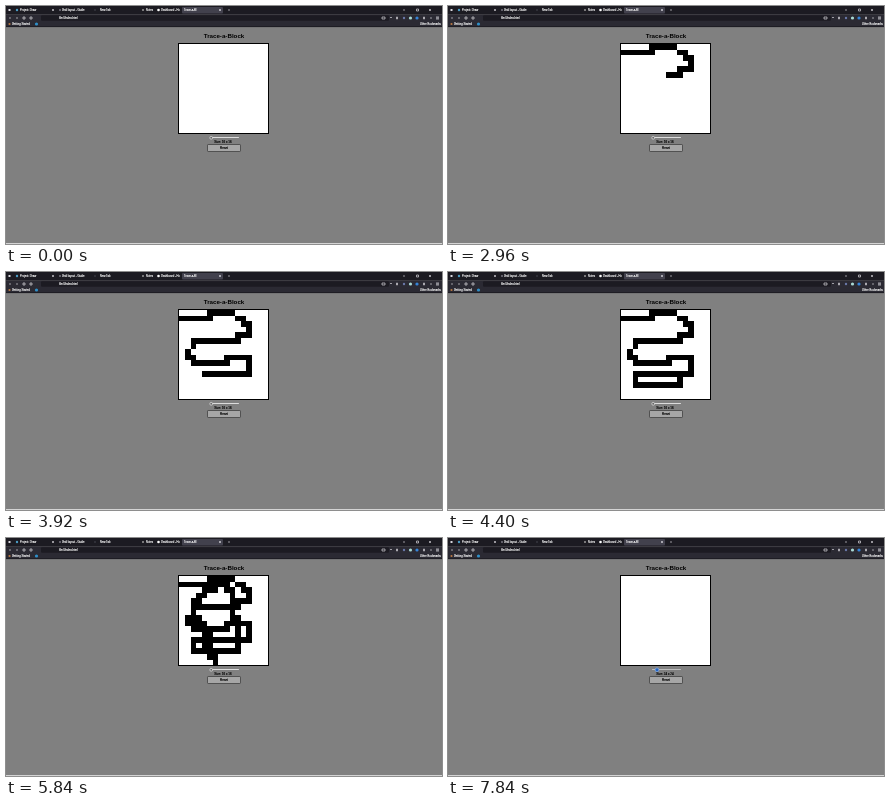
Write an HTML page that moves like this. It is 436x238 px and loops after 8000 ms.

```html
<!DOCTYPE html>
<html lang="en">
<head>
<meta charset="utf-8">
<title>Trace-a-Block</title>
<style>
  html, body { margin: 0; width: 100%; height: 100%; overflow: hidden; background: #808080; }
  svg { display: block; width: 436px; height: 238px; }
  text { font-family: "Liberation Sans", Arial, sans-serif; }
  .chrome text { font-size: 2.7px; fill: #fff; stroke: #fff; stroke-width: .12; }
  .icons { fill: none; stroke: #eeedf2; stroke-width: .6; }
  .page text { text-anchor: middle; fill: #000; }
  .page .small { font-size: 3px; stroke: #000; stroke-width: .15; }
  #cells { shape-rendering: crispEdges; }
</style>
</head>
<body>
<svg viewBox="0 0 436 238">
  <rect width="436" height="238" fill="#808080"/>
  <g class="chrome">
    <rect width="436" height="8.5" fill="#1c1b22"/>
    <rect y="8.5" width="436" height="12.5" fill="#2b2a33"/>
    <rect y="20.5" width="436" height=".6" fill="#121117"/>
    <rect x="176" y="1" width="41" height="6.6" rx="1" fill="#42414d"/>
    <rect x="35" y="9.2" width="348" height="5.6" rx="1" fill="#1c1b22"/>
    <rect x="2.5" y="3" width="2" height="2" fill="#d8d7de"/>
    <circle cx="11" cy="4" r="1.2" fill="#4b9cc4"/>
    <circle cx="54" cy="4" r="1" fill="#777680"/>
    <circle cx="89" cy="4" r=".7" fill="#555460"/>
    <circle cx="137" cy="4" r="1" fill="#999"/>
    <circle cx="152.5" cy="4" r="1.3" fill="#fff"/>
    <text x="14" y="5">Project: Draw</text>
    <text x="56" y="5">Grid layout - Guide</text>
    <text x="94" y="5">New Tab</text>
    <text x="140" y="5">Notes</text>
    <text x="155" y="5">Dashboard - Ho</text>
    <text x="178" y="5">Trace-a-Bl</text>
    <text x="53" y="12.9">file:///index.html</text>
    <circle cx="3.5" cy="18" r="1.1" fill="#b97843"/>
    <text x="6" y="18.9">Getting Started</text>
    <circle cx="30.5" cy="18" r="1.6" fill="#2f8fc8"/>
    <text x="414" y="18.9">Other Bookmarks</text>
    <g class="icons">
      <path d="M4.5 11 3.5 12 4.5 13M10.5 11 11.5 12 10.5 13M17 11h2v2h-2zM24 11h2v2h-2z"/>
      <path d="M46 3l2 2M48 3l-2 2M213 3l2 2M215 3l-2 2M222 4h2"/>
      <path d="M397 4h2M410.5 3h2v2h-2zM423 3l2 2M425 3l-2 2"/>
      <path d="M376 11h3v2h-3zM384 11.5h2M390.5 11h1v2h-1zM417.5 11h1v2h-1zM424 12h2M430 11h3M430 12h3M430 13h3"/>
    </g>
    <circle cx="398" cy="12" r="1.2" fill="#6977a7"/>
    <circle cx="404.5" cy="12" r="1.6" fill="#a9d9d4"/>
    <circle cx="411" cy="12" r="1.6" fill="#3684d8"/>
  </g>
  <g class="page">
    <text x="218" y="32.3" font-size="6.2" font-weight="bold">Trace-a-Block</text>
    <rect x="172.5" y="37.5" width="90" height="90" fill="#fff" stroke="#000"/>
    <g id="cells"></g>
    <rect id="track" x="204" y="131" width="29" height="1" rx=".5"/>
    <circle id="thumb" cy="131.8" stroke-width=".6"/>
    <text id="label" class="small" x="217" y="137"></text>
    <rect x="201.5" y="138.5" width="33" height="7" rx=".6" fill="#a6a6a6" stroke="#4a4a4a" stroke-width=".9"/>
    <text class="small" x="218" y="143">Reset</text>
  </g>
  <rect y="237" width="436" height="1" fill="#d4d4d4"/>
</svg>
<script>
  const LOOP = 8000, STEP = 80, CLEAR = 6320;
  const CELL = 5.56, LEFT = 173.47, TOP = 38.15;
  const $ = id => document.getElementById(id);

  function setAttrs(node, attrs) {
    for (const key in attrs) node.setAttribute(key, attrs[key]);
  }

  // Each stroke: first step, last step, corners as "column,row".
  const strokes = [
    [2400, 2400, "0,1 2,1"],
    [2480, 3040, "3,1 5,1 5,0 9,0 10,1 11,1 11,2 12,2 12,4 10,4 10,5 6,5"],
    [3200, 3520, "5,5 2,5 2,6 1,7 1,8 2,8 2,9 8,9 8,8"],
    [3600, 4000, "9,8 12,8 12,11 2,11 2,12"],
    [4080, 4400, "2,13 10,13 10,12"],
    [4480, 4800, "10,11 10,7 9,8 9,2 8,2 8,1 6,1 6,2 4,2 4,3 3,3 3,4 2,4 2,6"],
    [4960, 5360, "3,7 2,7 2,8 4,8 4,10 5,10 5,12 4,12 5,13 5,14 6,14 6,15"]
  ];

  function trace(corners) {
    const points = corners.split(" ").map(p => p.split(",").map(Number));
    const path = [points[0]];
    for (const [toX, toY] of points.slice(1)) {
      let [x, y] = path[path.length - 1];
      while (x !== toX || y !== toY) {
        x += Math.sign(toX - x);
        y += Math.sign(toY - y);
        path.push([x, y]);
      }
    }
    return path;
  }

  const cells = strokes.flatMap(([start, end, corners]) => {
    const path = trace(corners), steps = (end - start) / STEP + 1;
    return path.map(([col, row], i) => {
      const node = document.createElementNS("http://www.w3.org/2000/svg", "rect");
      setAttrs(node, { x: LEFT + col * CELL, y: TOP + row * CELL, width: CELL, height: CELL });
      $("cells").append(node);
      return { node, at: start + Math.floor(i * steps / path.length) * STEP };
    });
  });

  function draw(t) {
    for (const { node, at } of cells) {
      node.style.display = t >= at && t < CLEAR ? "" : "none";
    }
    const hover = (t >= 5520 && t < 5840) || t >= 7040;
    const active = t >= 7440;
    const drag = active ? Math.min(1, (Math.floor((t - 7440) / STEP) + 1) / 6) : 0;
    const size = 16 + Math.round(drag * 8);
    setAttrs($("track"), { fill: hover ? "#bbb" : "#dcdcdc" });
    setAttrs($("thumb"), {
      cx: 205.2 + drag * 3.8,
      r: active ? 1.9 : 1.4,
      fill: active ? "#2464c4" : hover ? "#444" : "#666",
      stroke: active ? "#8fb7ee" : "#f4f4f4"
    });
    $("label").textContent = `Size: ${size} x ${size}`;
  }

  function tick() {
    draw(performance.now() % LOOP);
    requestAnimationFrame(tick);
  }
  tick();
</script>
</body>
</html>
```
